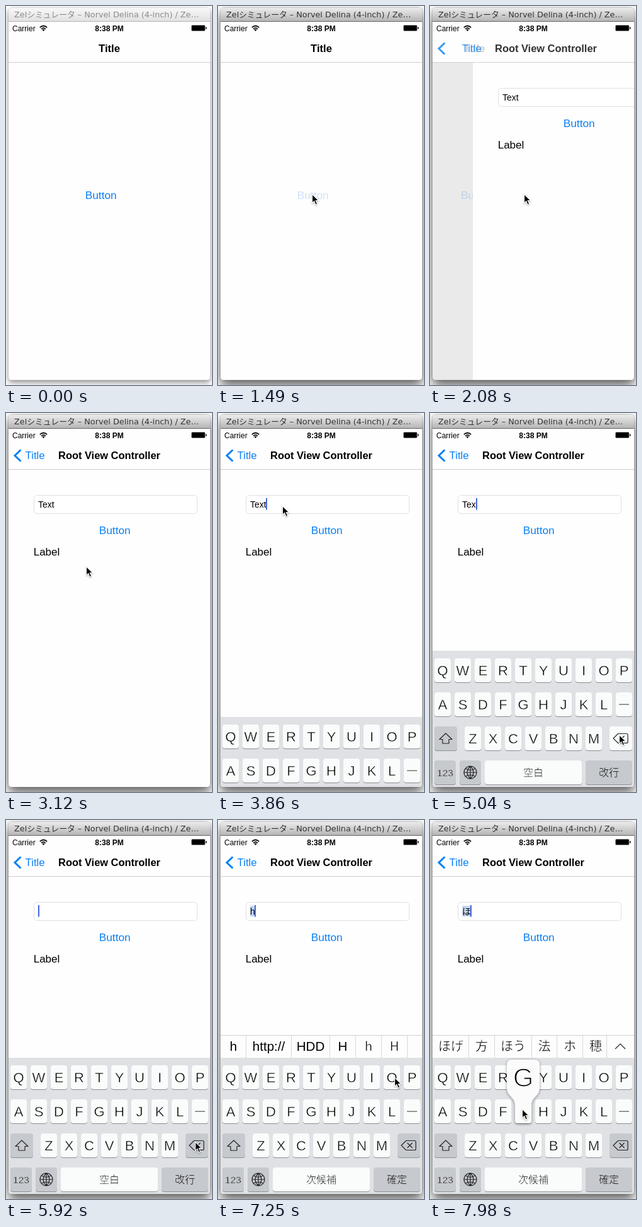
An HTML page that plays this animation: 327 px wide and 601 px high, repeating every 8000 ms.

```html
<!DOCTYPE html>
<html lang="ja">
<head>
<meta charset="utf-8">
<style>
html, body { margin: 0; width: 100%; height: 100%; overflow: hidden; background: #fff; }
svg { display: block; width: 327px; height: 601px; }
text { font-family: "Liberation Sans", "Noto Sans CJK JP", "Noto Sans CJK", sans-serif; white-space: pre; }
.bar { font-family: "DejaVu Sans", "Noto Sans CJK JP", "Noto Sans CJK", sans-serif; }
/* A stroke in the backdrop's colour thins the letters */
.key { stroke-width: .5; }
.big { stroke-width: 1.6; }
.cjk { font-family: "Noto Sans CJK JP", "Noto Sans CJK", sans-serif; font-weight: 300; stroke-width: .5; }
.bold { font-weight: bold; }
.icon { fill: none; stroke: #222; stroke-width: 1.2; }
</style>
</head>
<body>
<svg id="stage" viewBox="0 0 327 601"></svg>
<script>
const LOOP = 8000, STEP = 147.75;
const BLUE = '#0a80f5';
const stage = document.getElementById('stage');

// Pointer stops: step, x, y
const STOPS = [
  [1, 313, 394], [3, 270, 365], [6, 165, 308], [8, 149, 299], [20, 149, 299],
  [21, 127, 244], [22, 112, 190], [23, 104, 155], [24, 102, 148], [28, 102, 148],
  [31, 220, 390], [33, 300, 511], [41, 300, 511], [42, 290, 505], [44, 179, 462],
  [46, 179, 462], [49, 280, 409], [51, 280, 409], [54, 146, 459]
];
const PUSH = [0.3, 0.8, 0.97];
const RISE = [105, 18, 2];

const text = (x, y, size, str, fill = '#000', extra = '') =>
  `<text x="${x}" y="${y}" font-size="${size}" fill="${fill}" ${extra}>${str}</text>`;
const mid = (x, y, size, str, cls = '', backdrop = 'none') =>
  text(x, y, size, str, '#000', `text-anchor="middle" class="${cls}" stroke="${backdrop}"`);
const rect = (x, y, w, h, fill, extra = '') =>
  `<rect x="${x}" y="${y}" width="${w}" height="${h}" fill="${fill}" ${extra}/>`;
const icon = (d, extra = '') => `<path class="icon" d="${d}" ${extra}/>`;
const fade = (opacity, body) => `<g opacity="${opacity}">${body}</g>`;
const shift = (x, y, body) => `<g transform="translate(${x} ${y})">${body}</g>`;

const OUTLINE = 'M4 25V8Q4 3 9 3H319Q324 3 324 8V588Q324 593 319 593H9Q4 593 4 588Z';
const DEFS = `<defs>
  <clipPath id="win"><path d="${OUTLINE}"/></clipPath>
  <linearGradient id="on" x2="0" y2="1"><stop stop-color="#ececec"/><stop offset="1" stop-color="#b3b3b3"/></linearGradient>
  <linearGradient id="off" x2="0" y2="1"><stop stop-color="#f8f8f8"/><stop offset="1" stop-color="#e0e0e0"/></linearGradient>
</defs>`;

function frameWindow(active) {
  const shadow = active ? '0 8px 9px rgba(0,0,0,.66)' : '0 4px 4px rgba(0,0,0,.42)';
  return `<path d="${OUTLINE}" fill="#fefefe" stroke="${active ? '#777' : '#aaa'}" stroke-width=".6"
      style="filter:drop-shadow(${shadow})"/>
    <path d="M4 25V8Q4 3 9 3H319Q324 3 324 8V25Z" fill="url(#${active ? 'on' : 'off'})"/>` +
    rect(4, 24, 320, 1, active ? '#666' : '#b4b4b4') +
    text(13, 18.4, 12.8, 'Zelシミュレータ – Norvel Delina (4-inch) / Ze…', active ? '#333' : '#8a8a8a', 'class="bar"');
}

function navBar(p) {
  return rect(4, 25, 320, 64, '#fefefe') + rect(4, 89, 320, 1, '#cfcfcf') +
    text(10, 39.5, 12, 'Carrier') + mid(164, 39.5, 12, '8:38 PM', 'bold') +
    `<g fill="none" stroke="#000" stroke-width="1.7"><path d="M53.8 34.2Q59.5 28.8 65.2 34.2M56 36.5Q59.5 33.2 63 36.5"/></g>
     <path d="M57.3 37.6Q59.5 35.8 61.7 37.6L59.5 40Z"/>` +
    rect(294.5, 30.5, 21.5, 9, '#000', 'rx="1.5" stroke="#888" stroke-width=".7"') + rect(317, 33.5, 1.5, 3, '#000') +
    fade(1 - p, mid(164 - 117 * p, 73, 16.6, 'Title', 'bold')) +
    fade(p, `<path d="M23.5 58.5L14 67.5L23.5 76.5" fill="none" stroke="${BLUE}" stroke-width="3"/>` +
      text(30.6 + 100 * (1 - p), 73, 16.8, 'Title', BLUE) +
      mid(164 + 100 * (1 - p), 73, 16.4, 'Root View Controller', 'bold'));
}

function field(n) {
  let str = 'Text';
  if (n >= 34) str = 'Tex';
  if (n >= 36) str = 'Te';
  if (n >= 37) str = 'T';
  if (n >= 39) str = '';
  if (n >= 46) str = 'h';
  if (n >= 51) str = 'ほ';
  const width = { Text: 25, Tex: 22, Te: 15, T: 8, '': 0, h: 7, 'ほ': 13 }[str];
  const marked = n >= 46;
  const caret = n >= 26 && (n < 41 || n > 43);
  return rect(44.5, 130.5, 259, 29, '#fff', 'rx="5" stroke="#e0e0e0"') +
    (marked ? rect(51, 136, width, 17, '#c8d6ef') : '') +
    text(51, 150, 14, str) +
    (caret ? rect(51 + width, 135, 2, 18.5, '#4468e0') : '');
}

function pages(n, p) {
  const first = rect(4, 90, 320, 504, '#fefefe') +
    text(125.7, 306, 17.3, 'Button', n >= 10 ? '#d0e3fb' : BLUE);
  const second = rect(4, 90, 320, 504, '#fefefe') + field(n) +
    text(147.7, 192, 17.3, 'Button', BLUE) + text(43.7, 226, 17, 'Label');
  return (p < 1 ? shift(-96 * p, 0, first) + (p ? rect(4, 90, 320, 504, '#000', `opacity="${0.1 * p}"`) : '') : '') +
    (p ? shift(320 * (1 - p), 0, second) : '');
}

function key(x, y, w, label, dark, size = 22, cls = 'key') {
  const face = dark ? '#c6c9ce' : '#fafbfb';
  return rect(x, y + 1, w, 38, '#8b8e93', 'rx="4"') +
    rect(x, y, w, 38, face, 'rx="4"') +
    mid(x + w / 2, y + (size > 20 ? 27 : 25), size, label, cls, face);
}

function keyboard(n) {
  const row = (str, x, y) => [...str].map((c, i) => key(x + 32 * i, y, 26, c)).join('');
  const typing = n >= 46;
  return rect(4, 377, 320, 217, '#dfe1e5') +
    row('QWERTYUIOP', 7, 389) + row('ASDFGHJKL ', 7, 443) + row('ZXCVBNM', 55, 497) +
    rect(300, 461.5, 16, 1.2, '#555') +
    key(7, 497, 36, '', true) + key(285, 497, 36, '', ![34, 36, 37, 39].includes(n)) +
    icon('M25 508L35 517.5H30V524H20V517.5H15Z', 'stroke-linejoin="round"') +
    icon('M291 516L298.5 508.5H312Q314 508.5 314 510.5V521.5Q314 523.5 312 523.5H298.5ZM300.5 512L308.5 520M308.5 512L300.5 520') +
    key(7, 551, 34, '123', true, 15.5) + key(47, 551, 34, '', true) +
    icon('M54 570A10 10 0 0 0 74 570A10 10 0 0 0 54 570H74M64 560V580M64 560Q54 570 64 580Q74 570 64 560M56.5 564Q64 568 71.5 564M56.5 576Q64 572 71.5 576', 'stroke-width=".9"') +
    key(87, 551, 154, typing ? '次候補' : '空白', false, 16, 'cjk') +
    key(247, 551, 74, typing ? '確定' : '改行', true, 16, 'cjk');
}

function candidates(n) {
  const kana = n >= 51;
  const words = kana ? ['ほげ', '方', 'ほう', '法', 'ホ', '穂'] : ['h', 'http://', 'HDD', 'H', 'h', 'H'];
  const edges = kana ? [4, 61, 102, 161, 201, 242, 280] : [4, 44, 116, 177, 218, 259, 300];
  const cells = words.map((word, i) => {
    const right = edges[i + 1];
    const center = kana && i === 5 ? 263 : (edges[i] + right) / 2 + 0.5;
    const light = kana || i > 3;
    return rect(right, 342, 1, 35, '#d8d8d8') +
      mid(center, 366, light ? 20 : 20.5, word, light ? 'cjk' : '', light ? '#fdfdfd' : 'none');
  }).join('');
  return rect(4, 341, 320, 36, '#fdfdfd') + rect(4, 341, 320, 1, '#d0d0d0') + cells +
    (kana ? icon('M294 363L302 355L310 363', 'stroke-width="1.4"') : '');
}

// Enlarged key; x is the key's centre, y its top edge
function popup(x, y, letter) {
  return shift(x, y, `<path d="M-18-63H18Q26-63 26-55V-18C26-5 13-4 13 10V34Q13 38 9 38H-9Q-13 38-13 34V10C-13-4-26-5-26-18V-55Q-26-63-18-63Z"
    fill="#fbfbfc" style="filter:drop-shadow(0 1px 2px rgba(0,0,0,.4))"/>` + mid(0, -20, 42, letter, 'big', '#fbfbfc'));
}

function pointer(n) {
  if (n < 1) return '';
  const i = Math.max(1, STOPS.findIndex(s => s[0] >= n));
  const [a, ax, ay] = STOPS[i - 1], [b, bx, by] = STOPS[i];
  const k = (n - a) / (b - a);
  return shift(ax + (bx - ax) * k, ay + (by - ay) * k,
    `<path d="M.5-.5V13.5L3.7 10.5L6 16L8.6 14.9L6.3 9.6H10.8Z" stroke="#fff" stroke-width="1.1"
      style="filter:drop-shadow(0 1px 1px rgba(0,0,0,.35))"/>`);
}

function render(n) {
  const p = n < 13 ? 0 : PUSH[n - 13] ?? 1;
  let keys = '';
  if (n >= 26) keys = shift(0, RISE[n - 26] ?? 0, keyboard(n));
  if (n >= 46) keys += candidates(n);
  if (n === 45) keys += popup(180, 443, 'H');
  if (n === 50) keys += popup(276, 389, 'O');
  if (n === 54) keys += popup(148, 443, 'G');
  stage.innerHTML = DEFS + frameWindow(n >= 10) +
    `<g clip-path="url(#win)">${pages(n, p)}${navBar(p)}${keys}</g>` + pointer(n);
}

let shown = -1;
function tick() {
  const n = Math.floor(performance.now() % LOOP / STEP);
  if (n !== shown) render(shown = n);
  requestAnimationFrame(tick);
}
tick();
</script>
</body>
</html>
```
